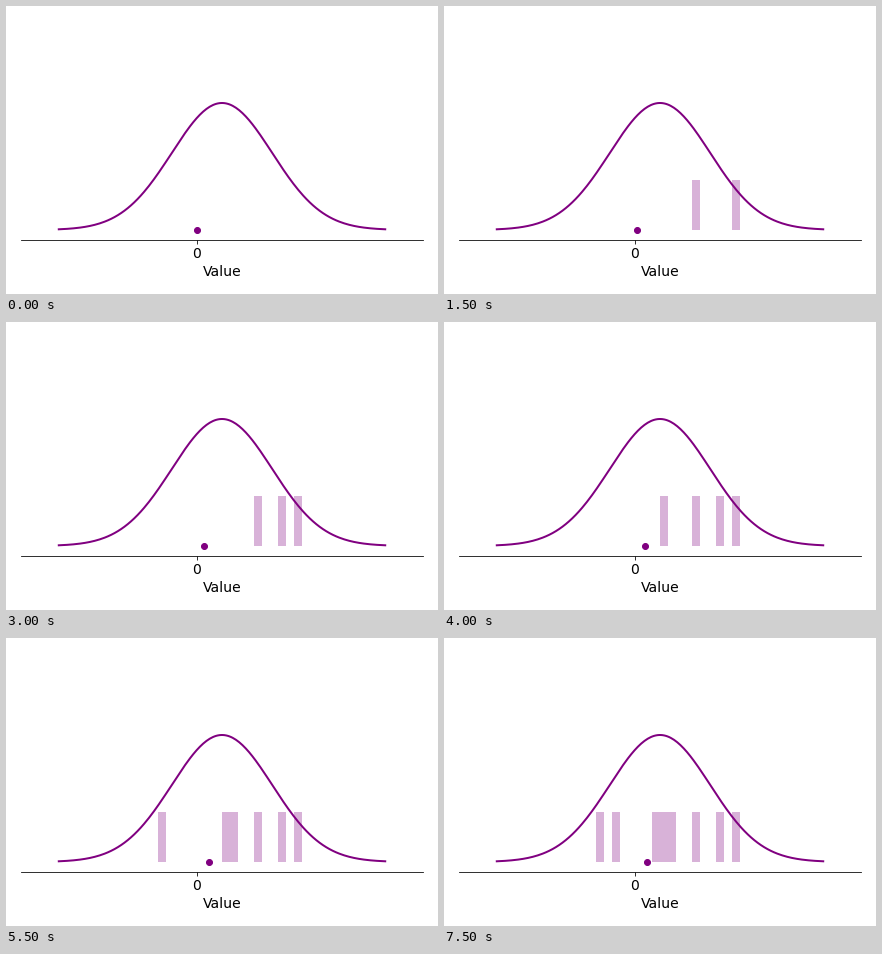
Write a matplotlib script that moves like this. It is 432 px wide and 288 px high and loops after 8000 ms.

```python
import numpy as np
import matplotlib.pyplot as plt
from matplotlib.animation import FuncAnimation

plt.rcParams.update({"font.family": "DejaVu Sans", "font.size": 14})

MEAN, BIN, STEP = 0.5, 0.16, 0.05
SAMPLES = [4, 9, 7, 0, 1, -8, -1, -6]  # bins drawn, counted from the mean

fig, ax = plt.subplots(figsize=(6, 4), dpi=72)
ax.set(xlim=(-3.5, 4.5), ylim=(-0.05, 1.05), xticks=[0], yticks=[], xlabel="Value")
ax.set_xticklabels(["0"])
ax.spines[["left", "top", "right"]].set_visible(False)

z = np.linspace(-3.25, 3.25, 200)
pdf = np.exp(-z**2 / 2) / np.sqrt(2 * np.pi)
ax.plot(z + MEAN, 1.6 * pdf, color="purple", lw=2)
dot, = ax.plot([0], [0], "o", color="purple", ms=6)

lefts = [MEAN + BIN * k for k in SAMPLES]
bars = ax.bar(lefts, 0.25, width=BIN, align="edge", color="purple", alpha=0.3, lw=0)
ax.set(xlim=(-3.5, 4.5), ylim=(-0.05, 1.05))
fig.tight_layout()

# The estimate takes a fixed step towards each new sample.
estimates = [0.0]
for left in lefts:
    estimates.append(estimates[-1] + STEP * np.sign(left + BIN / 2 - estimates[-1]))


def update(i):
    shown = (i + 1) // 2
    for n, bar in enumerate(bars):
        bar.set_visible(n < shown)
    dot.set_data([estimates[i // 2]], [0])
    return [*bars, dot]


anim = FuncAnimation(fig, update, frames=2 * len(SAMPLES), interval=500,
                     repeat=True, repeat_delay=0)
plt.show()
```
